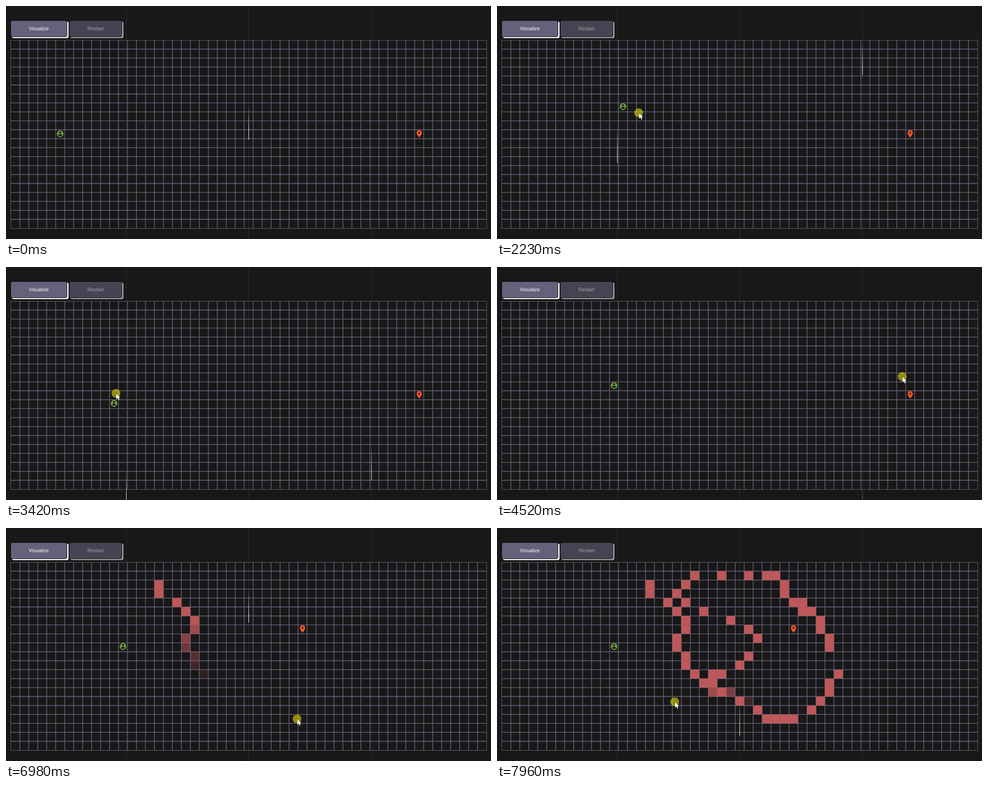
These frames come from a looping animation (1078 by 519 pixels, 8000 ms). An HTML page with a canvas:

```html
<!DOCTYPE html>
<html lang="en">
<head>
<meta charset="utf-8">
<title>Path grid</title>
<style>
  html, body { margin: 0; width: 100%; height: 100%; overflow: hidden; background: #181818; }
  canvas { position: absolute; left: 0; top: 0; }
  .btn {
    position: absolute; top: 32px; height: 37px; box-sizing: border-box;
    border: 1px solid #050505; border-radius: 4px; background: #65617b;
    box-shadow: 3px 2.5px 0 #fff; color: #fff; text-align: center;
    font: 11.17px/34px "Liberation Sans", Arial, sans-serif;
  }
  #run { left: 10px; width: 126px; }
  #reset { left: 140px; width: 118px; opacity: .6; }
</style>
</head>
<body>
<canvas id="stage" width="1078" height="519"></canvas>
<div class="btn" id="run">Visualize</div>
<div class="btn" id="reset">Restart</div>
<script>
const ctx = document.getElementById('stage').getContext('2d');
const LOOP = 8000, COLS = 53, ROWS = 21, SIZE = 19.95, LEFT = 10.75, TOP = 76.15;
const LAG = 120; // icons follow the pointer this much later
const cellX = c => LEFT + c * SIZE;
const cellY = r => TOP + r * SIZE;

// Pointer key points: time, column, row (whole numbers are cell centres)
const path = [
  [0, 50.6, 23], [850, 5.7, 10.1], [950, 5, 10], [1630, 9, 9.2], [2110, 13, 7],
  [2230, 14.75, 7.6], [2700, 13.5, 6.8], [3300, 11, 11], [3420, 11.2, 9.8], [3500, 12.1, 9],
  [4210, 47.2, 9.5], [4520, 44.1, 7.9], [4680, 45, 9.9], [5050, 39, 7.7], [5300, 36.6, 10],
  [5590, 33, 7], [5710, 32.35, 6.5], [5850, 32, 7]
];

// Corners of the drawn wall: mouse samples since the last corner, column, row
const corners = [
  [0, 16, 2], [1, 16, 3], [1, 18, 4], [2, 19.62, 6], [3, 19.3, 9], [2, 19.75, 11], [6, 29.2, 17],
  [3, 32.4, 17], [3, 36, 14], [2, 36.9, 12], [1, 36, 9], [3, 35, 6], [1, 34, 5.4], [5, 30.6, 2.4],
  [2, 29.4, .55], [3, 21, 1], [2, 19, 3], [1, 20, 4], [2, 24.8, 6], [2, 28.3, 8], [1, 27, 10],
  [2, 24.2, 12], [2, 22, 12.9], [1, 23, 14], [2, 26.4, 14.9], [2, 28.3, 16], [4.6, 18.76, 15.08]
];
const sampleTime = i => 6670 + 16.87 * i + .08 * i * i; // the hand slows down
let samples = 0;
for (const [n, c, r] of corners) path.push([sampleTime(samples += n), c, r]);

function pointer(t) {
  const end = path.findIndex(k => k[0] >= t);
  const i = end < 0 ? path.length - 1 : Math.max(1, end);
  const [t0, c0, r0] = path[i - 1], [t1, c1, r1] = path[i];
  const u = Math.min(1, (t - t0) / (t1 - t0));
  return [c0 + (c1 - c0) * u, r0 + (r1 - r0) * u];
}
const cellAt = t => pointer(t).map(Math.round);

// Each mouse sample turns one cell into wall; a cell keeps its first time
const walls = new Map();
for (let i = 0; i < samples; i++) {
  const t = sampleTime(i), cell = cellAt(t), key = cell.join();
  if (!walls.has(key)) walls.set(key, { cell, t });
}

// Cell of an icon dragged between two pointer times
const dragged = (t, from, to, home) => t - LAG < from ? home : cellAt(Math.min(t - LAG, to));

const personPath = new Path2D('M12 2a10 10 0 1 0 0 20a10 10 0 1 0 0-20zm0 3a3 3 0 1 1 0 6a3 3 0 1 1 0-6z' +
  'm0 14.2c-2.5 0-4.71-1.28-6-3.22.03-1.99 4-3.08 6-3.08 1.99 0 5.97 1.09 6 3.08-1.29 1.94-3.5 3.22-6 3.22z');
const tipPath = new Path2D('M9.5 21L12 24L14.5 21z');
const pinPath = new Path2D('M12 2C8.13 2 5 5.13 5 9c0 5.25 7 13 7 13s7-7.75 7-13c0-3.87-3.13-7-7-7z' +
  'm0 4.5a2.5 2.5 0 1 1 0 5a2.5 2.5 0 1 1 0-5z');
const arrowPath = new Path2D('M0 0V12.5L3 9.8L5.2 14.4L7.2 13.5L5 9H9z');

function icon([c, r], dy, scale, color, ...shapes) {
  ctx.save();
  ctx.translate(cellX(c + .5), cellY(r + .5) + dy);
  ctx.scale(scale, scale);
  ctx.translate(-12, -12);
  ctx.fillStyle = color;
  for (const s of shapes) ctx.fill(s, 'evenodd');
  ctx.restore();
}

function drawGrid() {
  ctx.strokeStyle = '#65607a';
  ctx.lineWidth = 1.6;
  ctx.beginPath();
  for (let c = 1; c < COLS; c++) { ctx.moveTo(cellX(c), 77); ctx.lineTo(cellX(c), 495); }
  for (let r = 1; r < ROWS; r++) { ctx.moveTo(11, cellY(r)); ctx.lineTo(1068, cellY(r)); }
  ctx.stroke();
  ctx.lineWidth = 1;
  ctx.strokeRect(10.5, 76.5, 1058, 419);
}

function drawWalls(t) {
  ctx.fillStyle = '#be5858';
  ctx.strokeStyle = 'rgba(100,90,120,.4)';
  ctx.lineWidth = .6;
  for (const { cell: [c, r], t: start } of walls.values()) {
    const u = (t - start - 105) / 140;
    if (u <= 0) continue;
    ctx.globalAlpha = Math.min(1, u) ** 1.3;
    ctx.fillRect(cellX(c), cellY(r), SIZE, SIZE);
    ctx.strokeRect(cellX(c), cellY(r), SIZE, SIZE);
  }
  ctx.globalAlpha = 1;
}

// cubic-bezier(.4, .26, 0, .97)
function dropEase(x) {
  let lo = 0, hi = 1;
  for (let i = 0; i < 24; i++) {
    const s = (lo + hi) / 2;
    if (1.2 * s * (1 - s) ** 2 + s ** 3 < x) lo = s; else hi = s;
  }
  return .78 * lo * (1 - lo) ** 2 + 2.91 * lo * lo * (1 - lo) + lo ** 3;
}

function fallingLine(x, delay, t) {
  const period = 7200, height = 520;
  const u = ((t + 1955 - delay + period) % period) / period;
  const y = height * (1.6 * dropEase(u) - .5), len = height * .15;
  ctx.fillStyle = 'rgba(255,255,255,.1)';
  ctx.fillRect(x, 0, 1, 519);
  const fade = ctx.createLinearGradient(0, y, 0, y + len);
  fade.addColorStop(0, 'rgba(255,255,255,0)');
  fade.addColorStop(.75, '#fff');
  ctx.fillStyle = fade;
  ctx.fillRect(x, y, 1, len);
}

function drawPointer(t) {
  const [c, r] = pointer(t);
  ctx.save();
  ctx.translate(cellX(c + .5), cellY(r + .5));
  ctx.fillStyle = 'rgba(255,245,0,.52)';
  ctx.beginPath();
  ctx.arc(0, 0, 9.8, 0, Math.PI * 2);
  ctx.fill();
  ctx.translate(.8, .8);
  ctx.strokeStyle = 'rgba(20,20,0,.7)';
  ctx.lineWidth = 1;
  ctx.stroke(arrowPath);
  ctx.fillStyle = '#fffff0';
  ctx.fill(arrowPath);
  ctx.restore();
}

function draw(t) {
  ctx.fillStyle = '#181818';
  ctx.fillRect(0, 0, 1078, 519);
  drawGrid();
  drawWalls(t);
  [[267, 2060], [539, 0], [812, 2575]].forEach(([x, delay]) => fallingLine(x, delay, t));

  const moved = t - LAG >= 950;
  const person = dragged(t, 950, 3500, [5, 10]);
  icon(person, moved ? -1.7 : -.9, .74, '#699c38', personPath, ...(moved ? [tipPath] : []));
  icon(dragged(t, 4680, 5850, [45, 10]), -.9, .82, '#ff5722', pinPath);
  drawPointer(t);
}

const begin = performance.now();
function tick() {
  draw((performance.now() - begin) % LOOP);
  requestAnimationFrame(tick);
}
tick();
</script>
</body>
</html>
```
